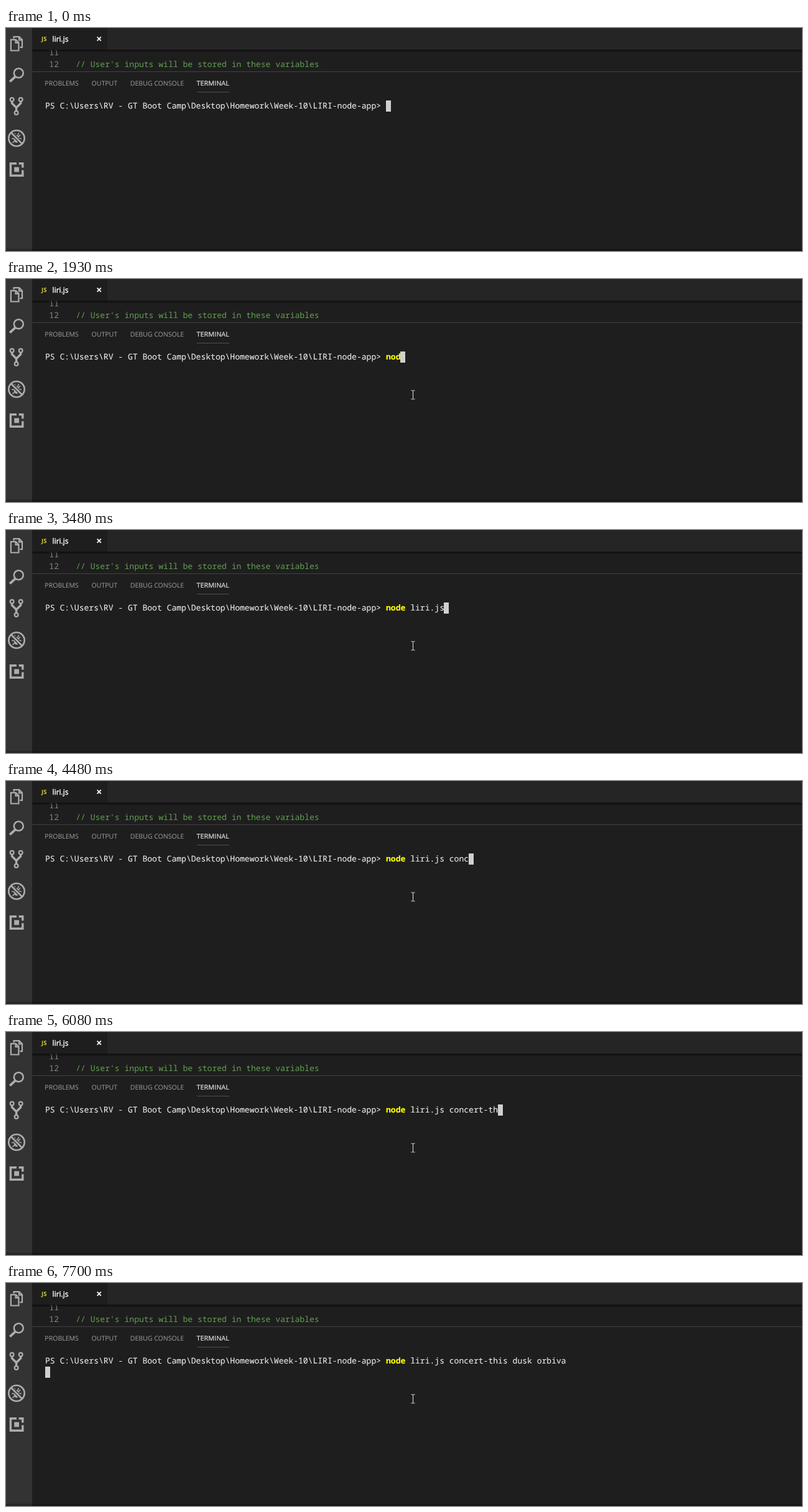
Write an HTML page that moves like this. It is 1280 px wide and 360 px high and loops after 8000 ms.

```html
<!DOCTYPE html>
<html lang="en">
<head>
<meta charset="utf-8">
<title>Terminal typing</title>
<style>
html, body { margin: 0; width: 100%; height: 100%; overflow: hidden; background: #1e1e1e; }
svg { display: block; width: 100vw; height: 100vh; }
text { white-space: pre; text-rendering: geometricPrecision; }
.mono { font: 13.05px "Noto Sans Mono", "DejaVu Sans Mono", monospace; }
.ui { font-family: "Open Sans", "Noto Sans", sans-serif; }
.tabs { font-size: 10.55px; fill: #a0a0a0; }
.icons { fill: none; stroke: #adadad; stroke-width: 2.2; }
.icons .solid { fill: #adadad; stroke: none; }
</style>
</head>
<body>
<svg viewBox="0 0 1280 360" preserveAspectRatio="none">
  <defs>
    <linearGradient id="shade" x2="0" y2="1">
      <stop offset="0" stop-color="#000" stop-opacity=".6"/>
      <stop offset="1" stop-color="#000" stop-opacity="0"/>
    </linearGradient>
    <clipPath id="editor"><rect x="42" y="35.5" width="1238" height="35"/></clipPath>
  </defs>

  <rect width="1280" height="360" fill="#1e1e1e"/>
  <rect x="163" width="1117" height="35.5" fill="#252526"/>
  <rect width="42" height="360" fill="#333"/>

  <g class="icons">
    <path d="M7.9 18.9H15.8L20.4 23.5V36.5H7.9ZM15.6 18.9V24H20.4"/>
    <path d="M12.6 17V14.2H21.2L26 19V31.2H22.4M21 14.2V19.4H26"/>
    <circle cx="20.3" cy="72.8" r="7.5" stroke-width="2.6"/>
    <path d="M14.8 78.6L6.2 86.6" stroke-width="4"/>
    <circle cx="9.6" cy="115.6" r="2.9"/>
    <circle cx="23.7" cy="115.6" r="2.9"/>
    <circle cx="16.6" cy="137" r="2.9"/>
    <path d="M9.6 118.5V121.5L16.6 128.5L23.7 121.5V118.5M16.6 128V134" stroke-width="3.4"/>
    <g stroke-width="1.7">
      <ellipse class="solid" cx="17" cy="179" rx="4.4" ry="6.2"/>
      <path d="M9 178.5H25M10.5 185.5L14 182M23.5 185.5L20 182M11 172.5L14 175.5M23 172.5L20 175.5M15 173L13.5 169.5M19 173L20.5 169.5"/>
    </g>
    <path d="M8.4 169L25.8 187" stroke="#333" stroke-width="5.4"/>
    <circle cx="17" cy="178" r="12.7" stroke-width="2.6"/>
    <path d="M8.2 169L26 187" stroke-width="2.6"/>
    <path d="M17 218.8H7.4V238.3H26.8V229.5M20.6 218.8H26.8V225.5" stroke-width="3.4"/>
    <path class="solid" d="M13.2 224.6H21V232.4H13.2Z"/>
  </g>

  <g class="ui">
    <text x="57" y="20.5" font-size="9.6" font-weight="700" fill="#cbcb41">JS</text>
    <text x="74.6" y="22" font-size="12" fill="#fff" stroke="#fff" stroke-width=".4">liri.js</text>
  </g>
  <path d="M146.6 14.4L152.8 20.6M152.8 14.4L146.6 20.6" stroke="#f0f0f0" stroke-width="2"/>

  <g class="mono" clip-path="url(#editor)">
    <g fill="#858585"><text x="69.3" y="44.2">11</text><text x="69.3" y="63">12</text></g>
    <text x="112.2" y="63" fill="#62a052">// User's inputs will be stored in these variables</text>
  </g>
  <rect x="42" y="35" width="1238" height="4.5" fill="url(#shade)"/>
  <rect x="42" y="70" width="1238" height="1" fill="#414141"/>

  <g class="ui tabs">
    <text x="62.3" y="93">PROBLEMS</text>
    <text x="137.5" y="93">OUTPUT</text>
    <text x="199.7" y="93">DEBUG CONSOLE</text>
    <text x="306.6" y="93" font-size="10.85" fill="#e7e7e7" stroke="#e7e7e7" stroke-width=".2">TERMINAL</text>
  </g>
  <rect x="307" y="103" width="52" height="1" fill="#505050"/>

  <g class="mono" fill="#e6e6e6" stroke="#e6e6e6" stroke-width=".15">
    <text x="62.9" y="130">PS C:\Users\RV - GT Boot Camp\Desktop\Homework\Week-10\LIRI-node-app&gt; </text>
    <text x="611" y="130"><tspan id="verb" fill="#ff0" stroke="#ff0" font-weight="600"></tspan><tspan id="args"></tspan></text>
  </g>
  <rect id="caret" width="8" height="18" fill="#d0d0d0"/>
  <rect y="356.5" width="1280" height="3.5" fill="#000" opacity=".25"/>

  <circle id="click" cx="651.5" cy="186" r="14.5" fill="#ff0" fill-opacity=".47"/>
  <path id="pointer" d="M-3 -7H-1Q0 -7 0 -6Q0 -7 1 -7H3M0 -6V6M-3 7H-1Q0 7 0 6Q0 7 1 7H3" fill="none" stroke="#e4e4e4"/>
</svg>
<script>
const LOOP = 8000, CHAR = 7.83, LEFT = 63, START = 611;
const COMMAND = "node liri.js concert-this dusk orbiva";
const ENTER = 7700;

// [time in ms, characters on the line]
const KEYS = [
  [1780, 1], [1850, 2], [1930, 3], [2000, 4],
  [2310, 5], [2470, 6], [2560, 7], [2700, 9], [3010, 10], [3480, 12],
  [4110, 13], [4250, 14], [4410, 16], [4480, 17], [4720, 19], [5110, 20],
  [5260, 21], [5350, 22], [5510, 23], [5660, 24], [6080, 23],
  [6230, 24], [6310, 25], [6450, 26], [6520, 27], [6670, 29], [6760, 30],
  [6910, 31], [7050, 33], [7140, 34], [7320, 35], [7390, 36], [7460, 37]
];
const TYPO = { from: 5660, to: 6080, char: "s" };

const $ = id => document.getElementById(id);
const verb = $("verb"), args = $("args"), caret = $("caret"), click = $("click"), pointer = $("pointer");
const within = (t, a, b) => t >= a && t < b;
const show = (el, on) => el.setAttribute("visibility", on ? "visible" : "hidden");

function typedAt(t) {
  let count = 0;
  for (const [time, n] of KEYS) if (t >= time) count = n;
  const line = COMMAND.slice(0, count);
  return within(t, TYPO.from, TYPO.to) ? line.slice(0, -1) + TYPO.char : line;
}

function drawLine(t) {
  const line = typedAt(t), entered = t >= ENTER;
  verb.textContent = line.slice(0, 4);
  args.textContent = line.slice(4);
  caret.setAttribute("x", entered ? LEFT : Math.floor(START + line.length * CHAR));
  caret.setAttribute("y", entered ? 135 : 117);
}

// The pointer glides in from the lower right in ten discrete moves.
function drawPointer(t) {
  const step = Math.min(9, Math.floor((t - 210) / 80));
  const rest = (1 - step / 9) ** 2;
  show(pointer, step >= 0);
  pointer.setAttribute("transform", `translate(${654.5 + 373 * rest} ${187 + 115 * rest})`);
  show(click, within(t, 1160, 1300));
}

function render(t) {
  drawLine(t);
  drawPointer(t);
}

const origin = performance.now();
function tick() {
  render((performance.now() - origin) % LOOP);
  requestAnimationFrame(tick);
}
render(0);
requestAnimationFrame(tick);
</script>
</body>
</html>
```
